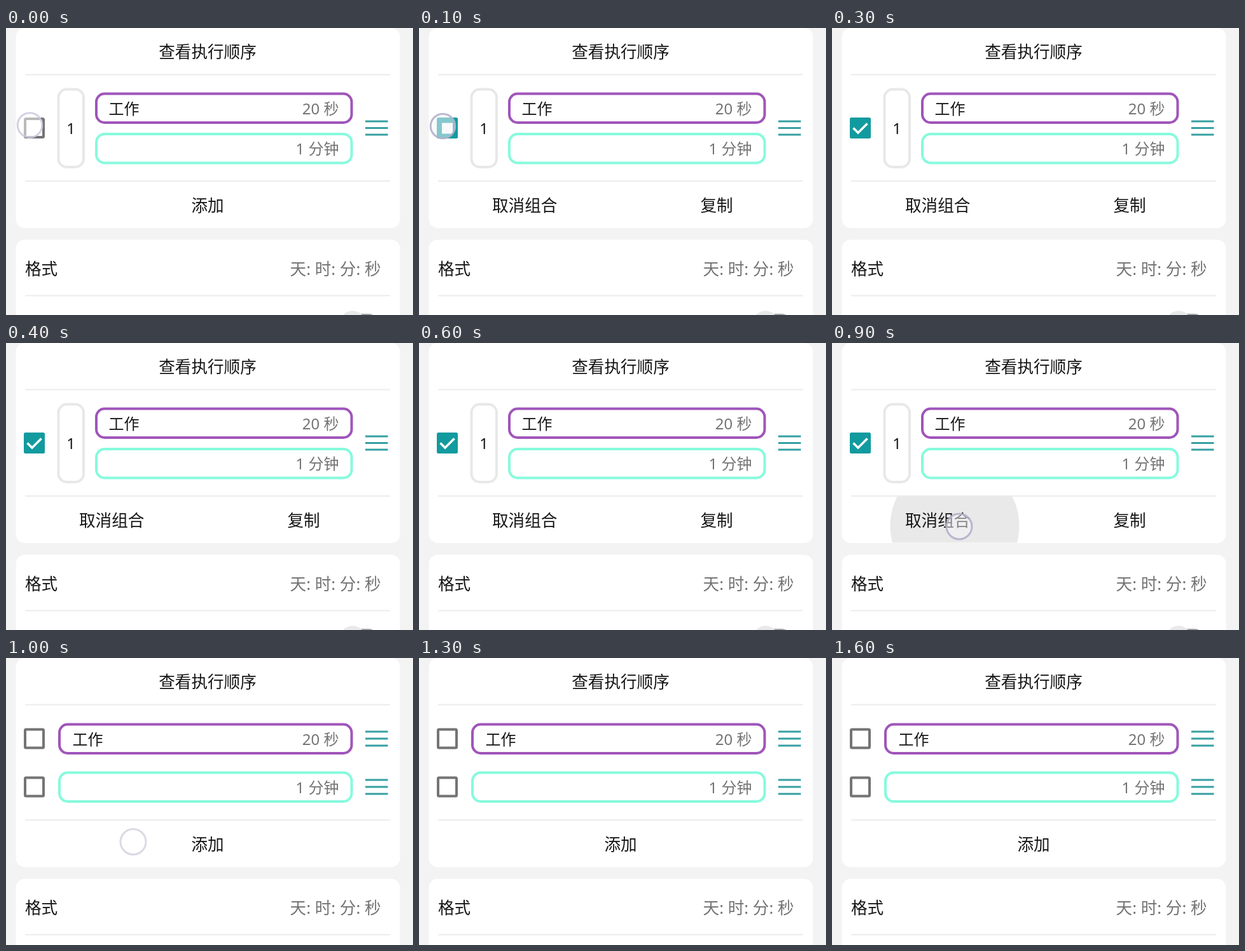
Animation, 640 px wide and 452 px high, one loop 1.7 s. Source, as an HTML page:

```html
<!DOCTYPE html>
<html lang="zh-CN">
<head>
<meta charset="utf-8">
<title>执行顺序</title>
<style>
html, body { margin: 0; width: 100%; height: 100%; overflow: hidden; background: #f3f3f3; }
svg { display: block; width: 640px; height: 452px; }
text { font-family: "Noto Sans", "Noto Sans CJK SC", "Noto Sans CJK", sans-serif; font-size: 25.6px; fill: #161616; }
.item { font-size: 24px; }
.soft { fill: #747474; text-anchor: end; }
.mid { text-anchor: middle; }
.rule { stroke: #ececec; stroke-width: 2; }
.card { fill: #fff; }
.bar { stroke: #36a0a2; stroke-width: 3; fill: none; }
.field { fill: #fff; stroke-width: 4; }
.work { stroke: #a055ba; }
.rest { stroke: #86fadd; }
.box { fill: #fff; stroke: #747474; stroke-width: 4; }
</style>
</head>
<body>
<svg viewBox="0 0 640 452">
  <defs>
    <clipPath id="cell"><rect x="30" y="242" width="288" height="72.5"/></clipPath>
  </defs>
  <rect width="640" height="452" fill="#f3f3f3"/>
  <rect id="top" class="card" x="15.5" y="0" width="604" height="315" rx="14"/>
  <text class="mid" x="317" y="47.3">查看执行顺序</text>
  <path class="rule" d="M30 73.5H604"/>

  <circle id="ripple" cx="193" cy="288" r="101.5" fill="#e9e9e9" clip-path="url(#cell)"/>

  <g id="grouped">
    <rect x="82.5" y="96.5" width="39.5" height="122.5" rx="13" fill="#fff" stroke="#e8e8e8" stroke-width="4"/>
    <text class="item mid" x="102" y="167">1</text>
    <rect class="field work" x="142" y="103.5" width="401.5" height="45.5" rx="13"/>
    <text class="item" x="161.5" y="136">工作</text>
    <text class="item soft" x="523.5" y="136">20 秒</text>
    <rect class="field rest" x="142" y="167" width="401.5" height="45.5" rx="13"/>
    <text class="item soft" x="523.5" y="199">1 分钟</text>
    <path class="bar" d="M565 147H600.5M565 157.5H600.5M565 168H600.5"/>
    <rect id="empty" class="box" x="30" y="143" width="29" height="29" rx="1.5"/>
    <g id="full">
      <rect x="28" y="141" width="33" height="33" rx="2.5" fill="#129b9f"/>
      <rect id="hole" x="36" y="149.5" width="17" height="17" fill="#fff"/>
      <path id="tick" d="M33.5 157.5L41 165L55.5 150.5" pathLength="1" stroke-dasharray="1 2" fill="none" stroke="#fff" stroke-width="3.6"/>
    </g>
  </g>

  <g id="split">
    <rect class="box" x="30" y="112.5" width="29" height="29" rx="1.5"/>
    <rect class="field work" x="84" y="104.5" width="459.5" height="45.5" rx="13"/>
    <text class="item" x="104.5" y="137">工作</text>
    <text class="item soft" x="523.5" y="137">20 秒</text>
    <path class="bar" d="M565 116H600.5M565 127H600.5M565 138H600.5"/>
    <rect class="box" x="30" y="188.5" width="29" height="29" rx="1.5"/>
    <rect class="field rest" x="84" y="180.5" width="459.5" height="45.5" rx="13"/>
    <text class="item soft" x="523.5" y="213">1 分钟</text>
    <path class="bar" d="M565 192H600.5M565 203H600.5M565 214H600.5"/>
  </g>

  <g id="lower">
    <path class="rule" d="M30 241H604"/>
    <text id="add" class="mid" x="317" y="288.8">添加</text>
    <g id="actions">
      <text x="115" y="288.8">取消组合</text>
      <text x="442.5" y="288.8">复制</text>
    </g>
    <rect class="card" x="15.5" y="333.5" width="604" height="160" rx="14"/>
    <text x="30" y="388.5">格式</text>
    <text class="soft" x="589.5" y="388.5">天: 时: 分: 秒</text>
    <path class="rule" d="M30 421.5H604"/>
    <rect x="535" y="450" width="50" height="30" rx="15" fill="#a6a6a6"/>
    <circle cx="545" cy="465" r="19.8" fill="#e9e9e9"/>
  </g>

  <circle id="touch" stroke-width="3"/>
</svg>
<script>
const LOOP = 1700, STEP = 100;
const $ = id => document.getElementById(id);
const show = (id, on) => $(id).style.display = on ? "" : "none";
const set = (id, attrs) => {
  for (const k in attrs) $(id).setAttribute(k, attrs[k]);
};

// Each tap appears, presses, then fades.
const taps = [
  { at: 0, x: 37.5, y: [153, 154.5, 154.5], r: 19.3 },
  { at: 800, x: 200, y: [289, 289, 289.5], r: 20 }
];
const phases = [
  { stroke: "#cbc9de", fill: "#ffffff", "fill-opacity": 0.5, "stroke-opacity": 0.85 },
  { stroke: "#b3b1cb", fill: "#f6f6fa", "fill-opacity": 0.5, "stroke-opacity": 0.9 },
  { stroke: "#cbc9da", fill: "#ffffff", "fill-opacity": 0.3, "stroke-opacity": 0.7 }
];

function drawTouch(t) {
  const tap = taps.find(p => t >= p.at && t < p.at + 3 * STEP);
  show("touch", tap);
  if (!tap) return;
  const n = (t - tap.at) / STEP;
  set("touch", { cx: tap.x, cy: tap.y[n], r: tap.r, ...phases[n] });
}

function draw(ms) {
  const t = Math.floor(ms % LOOP / STEP) * STEP;
  const checked = t >= 100, split = t >= 1000;

  show("grouped", !split);
  show("split", split);
  show("empty", !checked);
  show("full", checked);
  show("hole", t === 100);
  show("tick", t >= 200);
  set("tick", { "stroke-dashoffset": t === 200 ? 0.3 : 0 });

  show("add", !checked || split);
  show("actions", checked && !split);
  show("ripple", t === 900);
  set("lower", { transform: `translate(0 ${split ? 14.3 : 0})` });
  set("top", { height: split ? 329.3 : 315 });
  drawTouch(t);
}

const start = performance.now();
function tick() {
  draw(performance.now() - start);
  requestAnimationFrame(tick);
}
tick();
</script>
</body>
</html>
```
